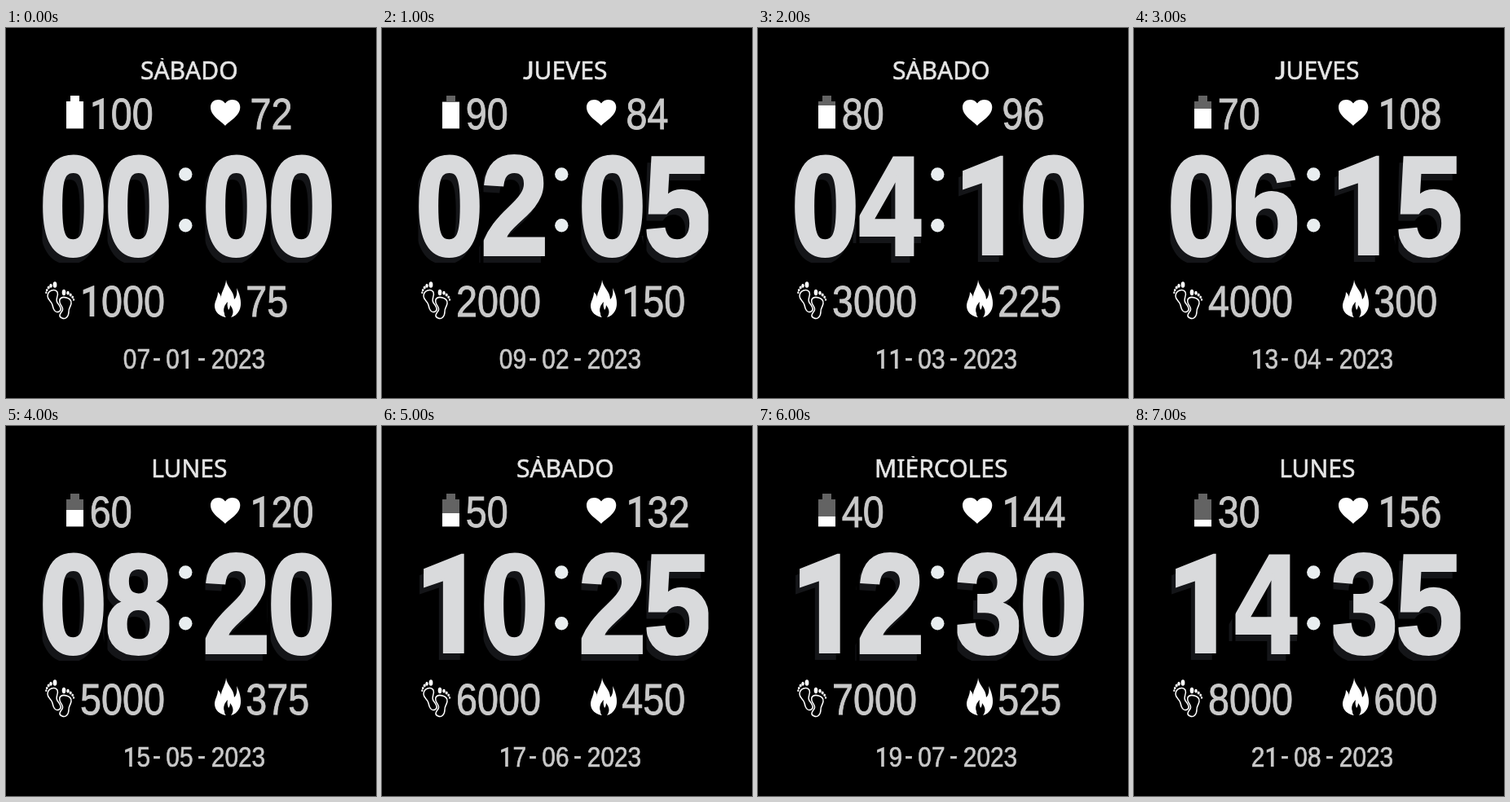
These frames come from a looping animation (454x454 px, 8000 ms). An HTML page:

```html
<!DOCTYPE html>
<html lang="es">
<head>
<meta charset="utf-8">
<title>Watch face</title>
<style>
  html, body { margin: 0; width: 100%; height: 100%; overflow: hidden; background: #000; }
  svg { display: block; width: 454px; height: 454px; }
  text { font-family: "Liberation Sans", Arial, sans-serif; fill: #c9c9c9; stroke: #c9c9c9; stroke-width: .9px; }
  .num { font-size: 54px; }
  .date { font-size: 34.5px; stroke-width: .7px; }
  .day { font: 500 30px "Noto Sans", "Open Sans", sans-serif; fill: #e6e6e6; stroke: #e6e6e6; stroke-width: .6px; text-anchor: middle; }
  .clock { filter: drop-shadow(-5px 8px 0 #141518); }
  .clock text { font-size: 173px; font-weight: 700; fill: #d9dadc; stroke: #d9dadc; stroke-width: 4px; text-anchor: middle; }
  /* plain glyphs: a 1 without a foot, a J that stays on the baseline */
  .one { font-family: Roboto, sans-serif; font-size: .98em; font-weight: 500; stroke-width: .2px; }
  .clock .one { font-weight: 900; stroke-width: 2px; }
  .jay { font-family: Lato, sans-serif; font-size: 1.05em; }
  .icon { fill: #fff; }
  .sole { fill: none; stroke: #fff; stroke-width: 1.5; }
</style>
</head>
<body>
<svg viewBox="0 0 454 454">
  <defs>
    <clipPath id="dayBox"><rect x="74" y="37" width="310" height="34"/></clipPath>
    <clipPath id="charge"><rect id="level" x="74" width="21"/></clipPath>
    <clipPath id="cells"></clipPath>
  </defs>
  <rect width="454" height="454"/>
  <g clip-path="url(#dayBox)"><text id="day" class="day" x="224.8" y="63"></text></g>

  <path fill="#636363" d="M74 90H79V83H90V90H95V123.5H74Z"/>
  <path class="icon" clip-path="url(#charge)" d="M74 90H79V83H90V90H95V123.5H74Z"/>

  <path class="icon" d="M269 120C264 114 251 108 251 97C251 87 264 85 269 92.5C274 85 287.3 87 287.3 97C287.3 108 274 114 269 120Z"/>

  <g clip-path="url(#cells)"><g id="clock" class="clock"></g></g>
  <g fill="#e9eef0"><circle cx="220.3" cy="179.5" r="8.2"/><circle cx="220.3" cy="242.3" r="8.2"/></g>

  <g id="feet" class="icon">
    <path class="sole" d="M51 329C51 322 60 319 63 324C65 329 60 332 63 337C67 342 69 346 65 348C60 350 58 345 57 340C56 335 51 334 51 329Z"/>
    <path class="sole" d="M66 333C69 328 81 331 80 338C79 343 77 343 77 348C77 354 73 358 69 356C64 354 66 351 69 347C72 342 64 340 66 333Z"/>
  </g>

  <path class="icon" d="M270 309C271 318 280 323 280 333C283 330 284 325 283 319C288 329 290 340 286 347C284 351 280 354 276 355C280 350 279 345 275 340C275 343 274 345 273 346C272 343 271 340 272 336C268 340 266 345 268 350C268 353 269 354 270 355C263 354 256 349 256 341C256 335 260 331 260 324C262 326 264 328 264 332C263 325 270 317 270 309Z"/>

  <g id="labels"></g>
</svg>
<script>
const STEP = 1000, STEPS = 8;
const DAYS = ["DOMINGO", "LUNES", "MARTES", "MIÈRCOLES", "JUEVES", "VIERNES", "SÀBADO"];
const $ = id => document.getElementById(id);
const two = n => String(n).padStart(2, "0");

function add(parent, tag, attrs) {
  const el = document.createElementNS("http://www.w3.org/2000/svg", tag);
  for (const key in attrs) el.setAttribute(key, attrs[key]);
  return parent.appendChild(el);
}

function write(el, value) {
  el.innerHTML = String(value)
    .replace(/1/g, "<tspan class='one'>$&</tspan>")
    .replace(/J/g, "<tspan class='jay'>$&</tspan>");
}

// Condensed face: all numerals share one horizontal ratio.
const CONDENSED = "scale(.865 1)";
const label = (x, y, cls) =>
  add($("labels"), "text", { class: cls, transform: `translate(${x} ${y}) ${CONDENSED}` });

const battery = label(102.8, 124.3, "num");
const pulse = label(299.5, 124.3, "num");
const steps = label(91, 353.5, "num");
const energy = label(294.3, 353.5, "num");
const date = label(143.8, 418.3, "date");
const month = label(196.3, 418.3, "date");
write(label(251.8, 418.3, "date"), 2023);
for (const x of [180, 235]) write(label(x, 416, "date"), "-");

// Each digit clips its own shadow to its cell.
const digits = [45, 125, 245, 325].map(x => {
  add($("cells"), "rect", { x: x - 0.5, y: 150, width: 76, height: 138 });
  return add($("clock"), "text", { transform: `translate(${x + 37.5} 278.3) ${CONDENSED}` });
});

const toes = [[60, 315, 2.4, 3.8], [55, 316.2, 1.7, 2.5], [52.2, 318.6, 1.5, 2], [50.2, 321.6, 1.3, 1.7], [49.3, 324.7, 1.1, 1.4],
  [71, 324.5, 2.3, 3.7], [76, 325.2, 1.7, 2.4], [79.2, 327.4, 1.5, 2], [81.7, 330.2, 1.3, 1.7], [83, 333.4, 1.1, 1.4]];
for (const [cx, cy, rx, ry] of toes) add($("feet"), "ellipse", { cx, cy, rx, ry });

function show(k) {
  const charge = 100 - 10 * k;
  const top = k ? 127 - 0.4 * charge : 83;
  const dom = 7 + 2 * k;
  write($("day"), DAYS[new Date(2023, k, dom).getDay()]);
  $("level").setAttribute("y", top);
  $("level").setAttribute("height", 123.5 - top);
  write(battery, charge);
  write(pulse, 72 + 12 * k);
  write(steps, 1000 * (k + 1));
  write(energy, 75 * (k + 1));
  write(date, two(dom));
  write(month, two(k + 1));
  const time = two(2 * k) + two(5 * k);
  digits.forEach((d, i) => write(d, time[i]));
}

const start = performance.now();
let current = -1;
function tick() {
  const k = Math.floor((performance.now() - start) / STEP) % STEPS;
  if (k !== current) show(current = k);
  requestAnimationFrame(tick);
}
tick();
</script>
</body>
</html>
```
